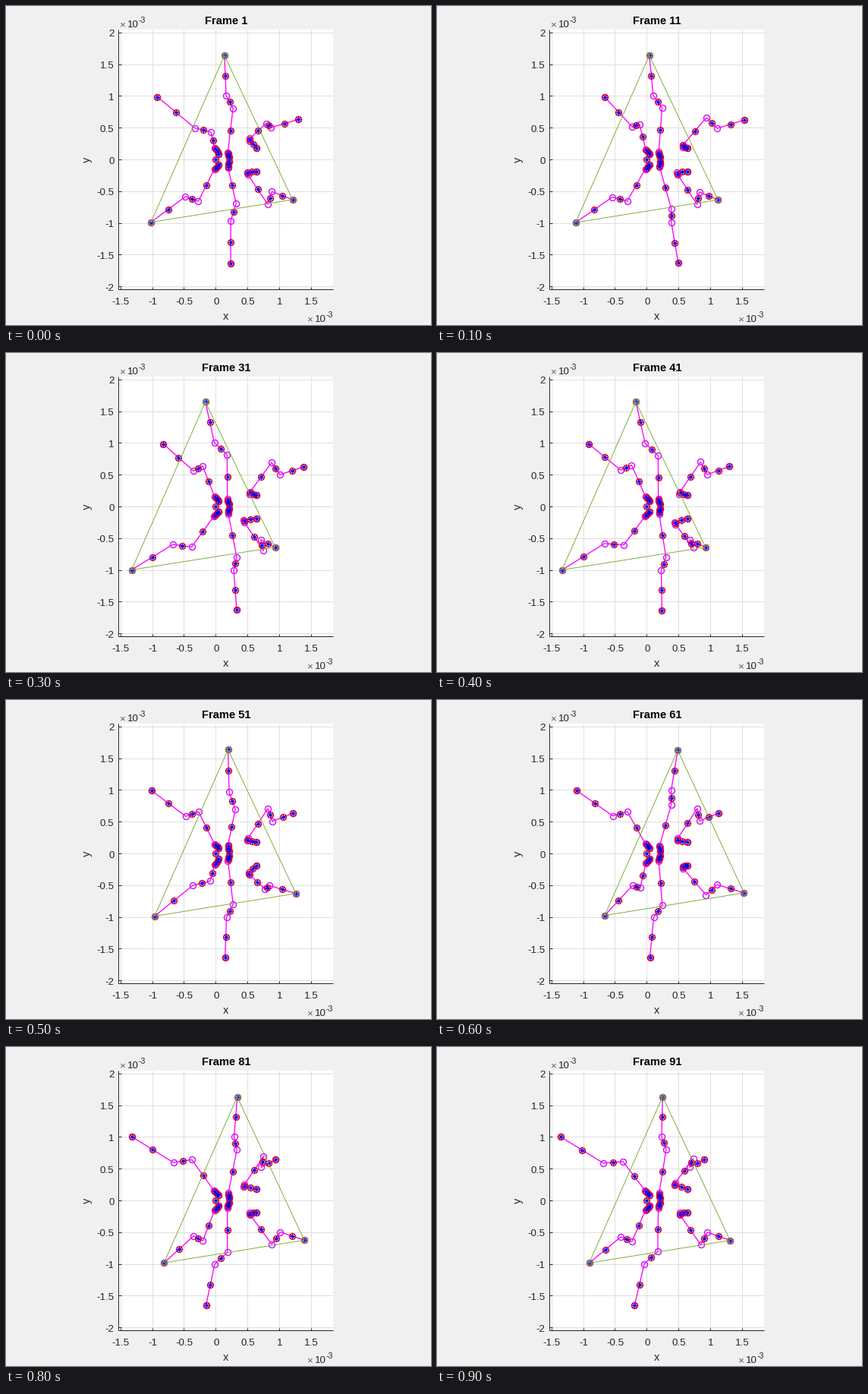
A matplotlib script that plays this animation: 560 by 420 pixels, repeating every 1000 ms.

```python
import numpy as np
import matplotlib.pyplot as plt
from matplotlib.animation import FuncAnimation
from matplotlib.patches import Rectangle

DPI = 96
WIDTH, HEIGHT = 560, 420
LEFT, RIGHT, TOP, BOTTOM = 148.2, 430.8, 31.3, 373.2
ORIGIN_X, ORIGIN_Y, UNIT = 276.2, 202.0, 83.65
STEPS, STEP_TIME = 10, 100
GAIT = 102        # simulation steps in one walking cycle
LIFT_OFF = 36.6   # phase at which the foot leaves the ground
SWING = 26.2      # steps the foot spends in the air
INK, GRID = "#262626", "#dfdfdf"
MAGENTA, GREEN = "#ff00ff", "#77ac30"


def stride(phase):
    """Foot travel, 1 in front to -1 behind: eased swing, steady stance."""
    p = (phase - LIFT_OFF) % GAIT
    if p < SWING:
        return -np.cos(np.pi * p / SWING)
    u = (p - SWING) / (GAIT - SWING)
    return 1 - 2 * u + 0.06 * np.sin(np.pi * u)


def lift(phase, peak):
    return np.exp(-((phase % GAIT - peak) / 8) ** 2)


class Leg:
    """Points are complex: x from the body origin + 1j * distance outwards.

    Each moving joint is (rest, per stride, per lift, per stride squared).
    """

    def __init__(self, hip, coxa, peak, *moving):
        self.hip, self.coxa, self.peak = hip, coxa, peak
        self.moving = moving

    def joints(self, phase):
        s, w = stride(phase), lift(phase, self.peak)
        outer = [rest + swing * s + raised * w + bow * s * s
                 for rest, swing, raised, bow in self.moving]
        return np.array([self.hip, outer[0] + self.coxa, *outer])


# Moving joints in order: trochanter, knee, ankle, foot.
middle = Leg(17.5 + 2.8j, 0.4 - 2.4j, 52,
             (16.2 + 9.5j, 0.9, 1.5j, 0),
             (22.9 + 67.4j, 9.2 - 0.9j, 1.6 - 9.3j, 0),
             (13.9 + 83.9j, 18.6, 1 - 3.3j, 0),
             (11.7 + 136.8j, 30 - 1j, 0, 0))
rear = Leg(4.2 + 6.6j, 2 - 2j, 52,
           (-1.5 + 12.5j, 0.5, 2.2j, 0),
           (-22.8 + 55j, 10.6 - 1.2j, 14 - 18.6j, -3.6j),
           (-39.8 + 48.9j, 19.6 - 2.9j, 7 - 6.5j, -2j),
           (-85.1 + 82.7j, 30.5 - 1j, 0, 0))
front = Leg(54.2 + 15.5j, -0.8 - 3.2j, 49.5,
            (42.5 + 19.8j, 5.6 - 1.2j, 1.3 + 9j, 0),
            (68.6 + 59j, 8.4 - 1j, -5 - 12.3j, 2.2 - 2j),
            (74.3 + 42.4j, 18.5 - 1.5j, -7, 1),
            (101.4 + 52.9j, 27.5 - 1j, 0, 0))

# (leg, upper side?, phase offset); the first three form the support triangle.
HALF = GAIT / 2
TRIPODS = [(middle, True, 0), (rear, False, 0), (front, False, 0),
           (middle, False, HALF), (rear, True, HALF), (front, True, HALF)]

plt.rcParams["font.family"] = "Liberation Sans"
fig = plt.figure(figsize=(WIDTH / DPI, HEIGHT / DPI), dpi=DPI,
                 facecolor="#f0f0f0")
ax = fig.add_axes([0, 0, 1, 1])
ax.set(xlim=(0, WIDTH), ylim=(HEIGHT, 0))
ax.axis("off")


def stroke(xs, ys, color=INK):
    ax.plot(xs, ys, color=color, lw=0.75, solid_capstyle="butt", zorder=1)


def label(x, y, text, size=10, ha="center", va="baseline", color=INK, **style):
    return ax.text(x, y, text, fontsize=size, ha=ha, va=va, color=color,
                   **style)


def exponent(x, y):
    label(x + 4.3, y, "×", color="#606060")
    label(x + 10.5, y, "10", ha="left")
    label(x + 25.5, y - 6, "-3", 8, ha="left")


def draw_axes():
    ax.add_patch(Rectangle((LEFT, TOP), RIGHT - LEFT, BOTTOM - TOP,
                           fc="white", ec="none", zorder=0))
    x_ticks = np.arange(-1.5, 1.6, 0.5)
    y_ticks = np.arange(-2, 2.1, 0.5)
    xs, ys = ORIGIN_X + UNIT * x_ticks, ORIGIN_Y - UNIT * y_ticks
    for x, value in zip(xs, x_ticks):
        stroke([x, x], [TOP, BOTTOM], GRID)
        label(x + 0.5, 393, f"{value:g}")
    for y, value in zip(ys, y_ticks):
        stroke([LEFT, RIGHT], [y, y], GRID)
        label(142.5, y + 5.6, f"{value:g}", ha="right")
    for x in xs:
        stroke([x, x], [BOTTOM, BOTTOM - 3.4])
    for y in ys:
        stroke([LEFT, LEFT + 3.4], [y, y])
    stroke([LEFT, RIGHT], [BOTTOM, BOTTOM])
    stroke([LEFT, LEFT], [TOP, BOTTOM])
    label(289.8, 413, "x", 11)
    label(114, 202, "y", 11, ha="right", va="center", rotation=90)
    exponent(149, 28.5)
    exponent(396, 416)


def markers(color, zorder, marker="o", size=6, width=1.0, line="none"):
    return ax.plot([], [], color=color, marker=marker, ms=size, mfc="none",
                   mec=color, mew=width, ls=line, lw=width, zorder=zorder)[0]


def place(artist, points):
    z = np.asarray(points)
    artist.set_data(ORIGIN_X + z.real, ORIGIN_Y - z.imag)


draw_axes()
title = label(290, 24, "", 11, weight="bold", color="black")
under_joints = markers("#00ffff", 2)
chains = [markers(MAGENTA, 3, line="-") for _ in TRIPODS]
masses = markers("#ff0000", 4)
stars = markers("#0000ff", 5, marker=(8, 2, 0), size=5.4, width=0.5)
support = markers(GREEN, 6, width=0.7, line="-")


def update(i):
    step = STEPS * i + 1
    joints, centres, feet = [], [0j], []
    for chain, (leg, upper, offset) in zip(chains, TRIPODS):
        points = leg.joints(step + offset)
        if not upper:
            points = points.conj()
        place(chain, points)
        joints.extend(points[:-1])
        centres.extend((points[1:] + points[:-1]) / 2)
        centres.append(points[0])
        feet.append(points[-1])
    place(under_joints, joints)
    place(masses, centres + feet)
    place(stars, centres + feet)
    place(support, feet[:3] + feet[:1])
    title.set_text(f"Frame {step}")
    return [under_joints, *chains, masses, stars, support, title]


animation = FuncAnimation(fig, update, frames=STEPS, interval=STEP_TIME,
                          repeat=True, repeat_delay=0)
plt.show()
```
